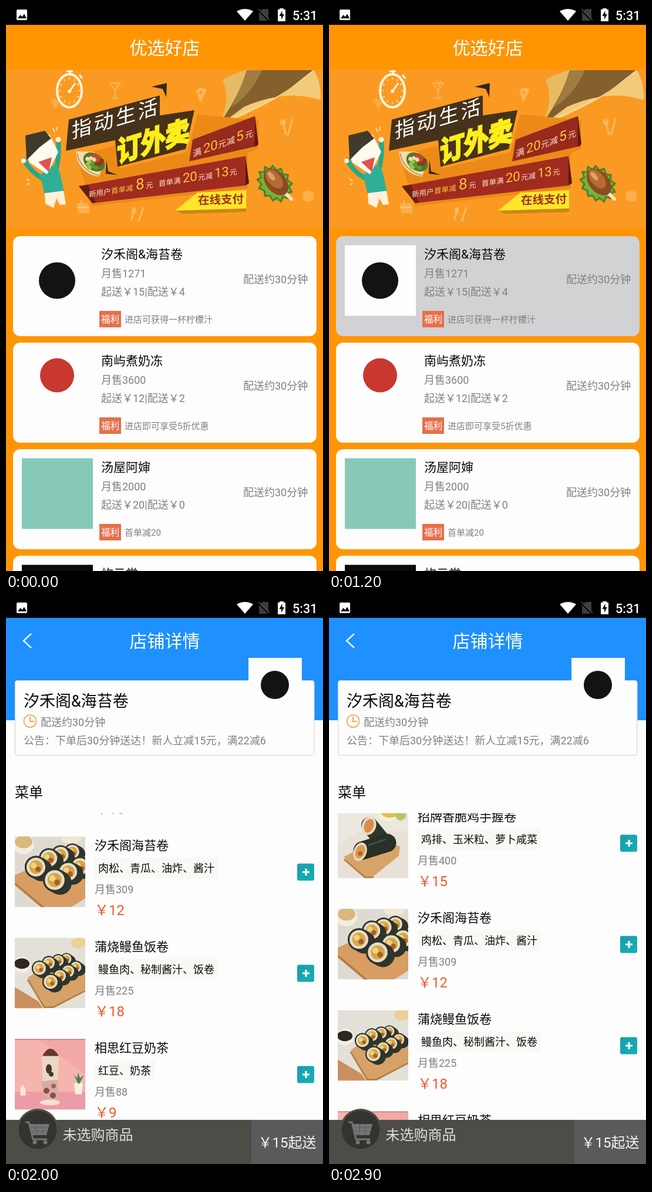
Write an HTML page that moves like this. It is 540 px wide and 960 px high and loops after 3 s.

```html
<!DOCTYPE html>
<html lang="zh-CN">
<head>
<meta charset="utf-8">
<title>优选好店</title>
<style>
html, body { margin: 0; width: 100%; height: 100%; overflow: hidden; background: #ff9503; }
svg { display: block; width: 100vw; height: 100vh; }
text { font-family: Roboto, "Noto Sans CJK SC", "Noto Sans CJK JP", "Noto Sans CJK", sans-serif; }
</style>
</head>
<body>
<svg id="stage" viewBox="0 0 540 960" xmlns="http://www.w3.org/2000/svg"></svg>
<script>
const PAPER = '#fdfdfd', GREY = '#808080', BLACK = '#0a0a0a', ORANGE = '#ff9503';

// cy is the middle of the Chinese glyphs
const text = (s, x, cy, size, fill = BLACK, extra = '') =>
  `<text x="${x}" y="${(cy + size * 0.37).toFixed(2)}" font-size="${size}" fill="${fill}" ${extra}>${s}</text>`;
const rect = (x, y, w, h, fill, r = 0, extra = '') =>
  `<rect x="${x}" y="${y}" width="${w}" height="${h}" rx="${r}" fill="${fill}" ${extra}/>`;
const circle = (x, y, r, fill, extra = '') => `<circle cx="${x}" cy="${y}" r="${r}" fill="${fill}" ${extra}/>`;
const oval = (x, y, rx, ry, fill, turn = 0) =>
  `<ellipse rx="${rx}" ry="${ry}" fill="${fill}" transform="translate(${x} ${y}) rotate(${turn})"/>`;
const path = (d, fill, extra = '') => `<path d="${d}" fill="${fill}" ${extra}/>`;
const line = (d, color, w, extra = '') =>
  `<path d="${d}" fill="none" stroke="${color}" stroke-width="${w}" ${extra}/>`;
const group = (body, extra = '') => `<g ${extra}>${body}</g>`;
const at = (x, y, body) => group(body, `transform="translate(${x} ${y})"`);

function statusBar() {
  return rect(0, 0, 540, 32, '#000') +
    rect(18, 6, 18, 18, '#fff', 2) + path('M20 21L24.500 15L27.500 18.500L31 13.500L35 21Z', '#000') +
    path('M393 9Q407 1 421 9L407 25Z', '#fff') +
    path('M437 5H447V25H431V11Z', '#3c3c3c') + line('M429 6L448 25', '#000', 3) + line('M430 5L449 24', '#555', 1.500) +
    path('M466 4H473V6H476V26H463V6H466Z', '#fff') + path('M470.500 8L465.500 17H469V23L474 14H470.500Z', '#000') +
    text('5:31', 488, 16, 21.500, '#fff', 'font-weight="500"');
}

function stopwatch() {
  let ticks = '';
  for (let i = 0; i < 12; i++) {
    ticks += `<path d="M0 -23V-19" stroke="#fff6e0" stroke-width="1.500" transform="translate(108 144) scale(.8 1) rotate(${i * 30})"/>`;
  }
  return `<ellipse cx="108" cy="144" rx="21" ry="28" fill="none" stroke="#fff6e0" stroke-width="4"/>` + ticks +
    line('M108 145L118 131M103 111H114M109 109V117M125 117L130 123', '#fff6e0', 3) + circle(108, 145, 3, '#fff6e0');
}

function pageCurl() {
  return path('M358 207Q386 163 369 126L376 121L410 108H424Q392 166 358 207Z', '#e6bb63') +
    path('M364 199Q398 152 410 109H526Q478 155 364 199Z', '#84602c') +
    path('M384 172Q402 137 410 109H436Q418 150 384 172Z', '#a17c40') +
    path('M360 205Q452 166 486 140L524 109Q537 128 536 160Q478 140 406 171Z', '#f3ca78') +
    line('M364 200Q450 165 486 139L524 109', '#fbe2ad', 1.500);
}

function boy() {
  return line('M31 262Q44 284 64 294M82 290Q92 260 89 228', '#27a88a', 8, 'stroke-linecap="round"') +
    path('M58 287L84 268L92 284L99 316L66 320Z', '#2fb096') +
    path('M66 318L98 314L102 337L92 338L86 327L81 343L67 336Z', '#fff1dc') +
    path('M34 248L74 218L89 248L70 286L40 266Z', '#fffaf0') +
    path('M33 220L66 212L77 225L57 240L35 262Z', '#403a2c') +
    path('M55 265L78 257L73 282Z', '#de544e') +
    circle(89, 227, 4.500, '#fff1dc') + circle(30, 263, 4, '#fff1dc') +
    line('M80 207L83 214M87 205L86 212M35 294L40 297M36 303L40 302', '#fff1dc', 1.500);
}

function wrapRoll() {
  const colors = ['#d2402c', '#5f9a2c', '#f0dcb4', '#8a3a1e', '#9ac448'];
  let filling = '';
  for (let i = 0; i < 16; i++) {
    const a = i * 2.4, r = Math.sqrt(i / 16);
    filling += circle((150 + 15 * r * Math.cos(a)).toFixed(1), (265 + 12 * r * Math.sin(a)).toFixed(1), 3.5, colors[i % 5]);
  }
  return path('M119 247Q122 284 158 290L168 268L150 248Z', '#f3dcae') + oval(150, 265, 20, 14, '#4c7a28', 35) +
    filling + line('M121 250Q127 279 158 288', '#b58a50', 1.500);
}

function lettuce(radius, fill) {
  let d = '';
  for (let i = 0; i < 26; i++) {
    const a = i * Math.PI / 13, r = radius * (i % 2 ? 0.84 : 1.06);
    d += `${i ? 'L' : 'M'}${(r * Math.cos(a)).toFixed(1)} ${(r * 0.8 * Math.sin(a)).toFixed(1)}`;
  }
  return group(path(d + 'Z', fill), 'transform="translate(458 302) rotate(48)"');
}

function drumstick() {
  return lettuce(34, '#4a8428') + lettuce(29, '#78b23a') +
    line('M470 312L486 328', '#f6e6c4', 6, 'stroke-linecap="round"') +
    oval(460, 299, 17, 26, '#8e4a20', -40) + oval(457, 294, 11, 19, '#b36c34', -40) + oval(452, 289, 4, 9, '#dca468', -40);
}

function faintIcons() {
  return line('M177 131H195L186 144ZM186 144V156M180 157H192M190 128L187 137', '#ffbf6c', 1.500) +
    path('M324 143Q334 135 342 143L331 164Z', '#ffb657') + circle(332, 147, 2.500, '#fb9a25') +
    line('M471 195L477 219M488 192L480 220M468 193L469 200L475 200L474 192', '#ffb960', 3) +
    line('M213 364L220 343M226 366L234 342M217 342L216 350L222 351', '#ffb960', 3) +
    path('M121 335H140L143 352H123Z', '#fdb04c') + line('M121 342H142M128 330V335', '#fdc582', 2) +
    path('M505 318Q514 309 525 318L523 330Q513 336 506 328Z', '#fdb04c') +
    path('M75 160Q81 153 91 163L84 175Z', '#fdab45');
}

function banner() {
  const skew = (x, y, slope, body, tall = 1) => group(body, `transform="matrix(1 ${slope} 0 ${tall} ${x} ${y})"`);
  const pale = '#ffe6c4', gold = '#ffc638';
  // [text, x, size, colour] pieces along a ribbon
  const run = list => list.map(([s, x, size, c]) => `<text x="${x}" y="0" font-size="${size}" fill="${c}">${s}</text>`).join('');
  return rect(0, 108, 540, 270, '#fb9a22') + faintIcons() + stopwatch() + pageCurl() +
    path('M120 254L190 236L194 276L309 248L326 184L430 194V242L412 250V310L146 340Z', '#ec8a18') +
    path('M107 193L262 152V186L321 177L306 243L190 273L186 228L102 246Z', '#46321a') +
    path('M248 137L274 131L273 155L267 141Z', '#33271a') + path('M171 262L174 281L190 287L170 285Z', '#33271a') +
    skew(112, 225, -0.29, `<text font-size="34" letter-spacing="3.500" font-weight="500" fill="#fff">指动生活</text>`) +
    skew(189, 266, -0.31, `<text font-size="42" letter-spacing="-1" font-weight="900" fill="#ffee1a" stroke="#ffee1a" stroke-width="2.500">订外卖</text>`, 1.15) +
    path('M318 227L424 187L428 238L312 264Z', '#962a1c') + path('M424 187L430 235L424 239Z', '#5a1810') +
    skew(318, 257, -0.35, run([['满', 0, 15, pale], ['20', 18, 22, gold], ['元减', 43, 14.500, pale], ['5', 74, 23, gold], ['元', 89, 14, pale]])) +
    path('M124 306L408 255V305L147 335Z', '#a02c20') + path('M408 255L414 301L408 305Z', '#5a1810') +
    path('M124 306L140 304L153 334L147 335Z', '#6a1e14') +
    skew(141, 325, -0.155, run([['新用户', 0, 12.500, pale], ['首单减', 38, 12.500, gold], ['8', 80, 26, gold], ['元', 97, 12.500, pale],
      ['首单满', 119, 12.500, pale], ['20', 160, 22, gold], ['元减', 186, 12.500, pale], ['13', 214, 22, gold], ['元', 240, 12.500, pale]])) +
    path('M288 348L326 317L409 313V344Z', '#ffe62a') + path('M288 348L409 344V350L300 353Z', '#c98814') +
    skew(327, 337, -0.03, `<text font-size="19.500" font-weight="700" fill="#a03018">在线支付</text>`) +
    boy() + wrapRoll() + drumstick();
}

const SHOP = '汐禾阁';
const shops = [
  [SHOP + '&amp;海苔卷', 1271, 15, 4, '进店可获得一杯柠檬汁', circle(60, 60, 31, '#151312')],
  ['南屿煮奶冻', 3600, 12, 2, '进店即可享受5折优惠', circle(60, 40, 29, '#c8382e')],
  ['汤屋阿婶', 2000, 20, 0, '首单减20', rect(0, 0, 121, 120, '#87c9b8')],
  ['炊云堂', 1800, 20, 3, '首单减10', rect(0, 0, 121, 120, '#0a0a0a')]
];

function shopCard([name, sold, min, fee, gift, logo], i) {
  return at(0, 391 + 181 * i,
    rect(12, 0, 517, 170, PAPER, 12, i ? '' : 'id="first"') +
    at(27, 15.500, rect(0, 0, 121, 120, PAPER) + logo) +
    text(name, 162, 30, 21) +
    text('月售' + sold, 162, 63, 18, GREY) +
    text(`起送￥${min}|配送￥${fee}`, 162, 94, 18, GREY) +
    text('配送约30分钟', 404, 73.500, 18, GREY) +
    rect(159, 127, 37, 28, '#e5704c') + text('福利', 162, 141.500, 15.500, '#fff') +
    text(gift, 202, 141.500, 15, GREY));
}

function listPage() {
  return rect(0, 32, 540, 928, ORANGE) + text('优选好店', 210.500, 70.500, 30, '#fff') +
    banner() + shops.map(shopCard).join('');
}

const slice = (x, y, r) => circle(x, y, r, '#30332c') + circle(x, y, r * 0.84, '#e6ddc4') +
  circle(x, y, r * 0.6, '#d6a548') + circle(x - r * 0.2, y - r * 0.15, r * 0.26, '#f1d37a') + circle(x + r * 0.2, y + r * 0.2, r * 0.24, '#a85e2c');
const roll = (x, y, dx, dy, r) =>
  line(`M${x} ${y}l${dx} ${dy}`, '#2d352c', r * 2, 'stroke-linecap="round"') + slice(x, y, r);

const photos = [
  () => rect(0, 0, 120, 120, '#ece7df') + path('M0 62L40 40H120V120H0Z', '#e7e1d7') +
    path('M10 84L70 52L106 66L104 82L60 117L46 118Z', '#d7a468') + line('M11 88L47 119L61 118', '#b98046', 3) +
    oval(88, 8, 20, 15, '#f8f0e0') + oval(89, 7, 16, 10, '#e7bd48') + circle(107, 13, 9, '#b5c668') +
    line('M54 30L72 52', '#2d352c', 28, 'stroke-linecap="round"') + oval(53, 31, 12, 16, '#e8dcc0', 20) + oval(53, 31, 8, 12, '#d98c4c', 20) +
    line('M42 73L84 60', '#283028', 31, 'stroke-linecap="round"') + line('M52 64L82 54', '#465044', 3) +
    oval(38, 75, 11, 16, '#e8dcc0', 20) + oval(38, 75, 8, 12, '#d99e4a', 20) + circle(38, 78, 4, '#b46432'),
  () => rect(0, 0, 120, 120, '#dedad2') + path('M0 66L60 38L120 60V105L96 120H50L0 78Z', '#d79d62') +
    line('M0 80L50 122', '#b77d44', 4) + oval(15, 13, 18, 17, '#f3ede2') + oval(15, 9, 15, 11, '#d8b97e') +
    oval(96, 4, 17, 8, '#f1e7d4') +
    roll(98, 26, 8, 4, 14) + roll(78, 31, 8, 4, 16) + roll(58, 37, 8, 5, 17) + roll(36, 52, 9, 5, 19) +
    roll(111, 51, 8, 4, 17) + roll(91, 60, 8, 4, 18) + roll(68, 74, 9, 5, 20),
  () => rect(0, 0, 120, 120, '#e3e0d8') + path('M0 84L40 108L48 120H0Z', '#c98f60') +
    path('M22 68L66 38L120 48V88L66 117L50 116Z', '#d6a268') + line('M22 71L50 118L66 118L120 90', '#b57e48', 3) +
    oval(12, 46, 15, 14, '#f2eee8') + oval(12, 44, 13, 9, '#302620') + oval(109, 9, 13, 9, '#e9d198') +
    roll(88, 36, 6, 4, 10) + roll(74, 39, 6, 4, 11) + roll(58, 43, 6, 4, 12) + roll(42, 52, 6, 4, 13) +
    roll(104, 50, 6, 4, 11) + roll(91, 57, 6, 4, 12) + roll(77, 65, 6, 4, 12) + roll(61, 75, 7, 4, 14),
  () => rect(0, 0, 120, 120, '#f2a8a4') + path('M0 0H40L120 60V90H0Z', '#f5b5ac') + rect(0, 90, 120, 30, '#ec9ca6') +
    rect(0, 0, 120, 1.500, '#b5766f') +
    path('M46 28H75L72 104Q60 110 49 104Z', '#ebd6c4') + path('M46 72L74 69L72 104Q60 110 49 104Z', '#d6aca4') +
    path('M47 29Q60 4 75 29Z', '#6b3430') + circle(54, 88, 5, '#8c4c4a') + circle(65, 96, 5, '#8c4c4a') + circle(66, 80, 4, '#a0625e') +
    oval(58, 51, 5, 8, '#43362e') + circle(62, 60, 4, '#43362e') + oval(60, 108, 17, 5, '#f8ded0') +
    path('M101 75H116L114 94H103Z', '#f7f0e4') + path('M108 76L100 60L106 67L108 57L111 67L118 61L110 76Z', '#478048') +
    path('M9 96L10 82L14 78L18 84L19 96Z', '#fbe4d6')
];

const dishes = [
  ['招牌香脆鸡手握卷', '鸡排、玉米粒、萝卜咸菜', 400, 15],
  [SHOP + '海苔卷', '肉松、青瓜、油炸、酱汁', 309, 12],
  ['蒲烧鳗鱼饭卷', '鳗鱼肉、秘制酱汁、饭卷', 225, 18],
  ['相思红豆奶茶', '红豆、奶茶', 88, 9]
];

function dish([name, parts, sold, price], i) {
  return at(0, 379 + 172 * i,
    at(15, 0, group(photos[i](), 'clip-path="url(#photo)"')) +
    text(name, 151, 15, 21) +
    rect(151, 36, parts.length * 18 + 12, 35, '#f8f8f4') + text(parts, 157, 54, 18) +
    text('月售' + sold, 151, 90, 18, GREY) +
    text('￥' + price, 151, 125, 24, '#ee5a30') +
    rect(496, 46, 29, 29, 'url(#teal)', 3) + line('M505 60.500H517M511 54.500V66.500', '#fff', 3));
}

function cartBar() {
  return circle(54, 901, 35, '#4d4d48') + rect(0, 885, 540, 75, '#4d4d48') + rect(418, 885, 122, 75, '#595a5c') +
    circle(54, 902, 32.500, '#333330') +
    line('M33 889H39L46 918H70', '#757575', 3) + path('M41 892H74L69 911H46Z', '#757575') +
    line('M43 898H72M44 904H71M52 892V911M62 892V911', '#5c5c5a', 1) +
    circle(49, 923, 3.500, '#757575') + circle(67, 923, 3.500, '#757575') +
    text('未选购商品', 96.500, 910.500, 24, '#dedede') + text('￥15起送', 429.500, 923, 24, '#f5f5f5');
}

function detailPage() {
  return rect(0, 32, 540, 928, PAPER) + rect(0, 32, 540, 174, '#1e90ff') +
    line('M43 59L30 71L43 83', '#e6f3ff', 2.500) + text('店铺详情', 210.500, 70.500, 30, '#fff') +
    rect(15.500, 138.500, 509.500, 127, PAPER, 4, 'stroke="#d6d6cc" stroke-width="1.200"') +
    rect(413, 100, 91, 91, PAPER) + circle(458, 146, 24, '#151312') +
    text(SHOP + '&amp;海苔卷', 30, 173, 27) +
    circle(41, 207.500, 10.500, '#fffaf0', 'stroke="#e9b872" stroke-width="2"') + line('M41 200V208H48', '#e9a85a', 2) +
    text('配送约30分钟', 59, 209, 18, GREY) +
    text('公告：下单后30分钟送达！新人立减15元，满22减6', 30, 240, 18, GREY) +
    text('菜单', 15, 328.500, 24) +
    group(group(dishes.map(dish).join(''), 'id="menu"'), 'clip-path="url(#list)"') + cartBar();
}

document.getElementById('stage').innerHTML =
  `<defs><clipPath id="photo"><rect width="120" height="120"/></clipPath>
  <clipPath id="list"><rect y="364" width="540" height="521"/></clipPath>
  <linearGradient id="teal" x2="1" y2="1"><stop stop-color="#1b9cad"/><stop offset="1" stop-color="#14b0b4"/></linearGradient></defs>` +
  group(listPage(), 'id="home"') + group(detailPage(), 'id="detail"') + statusBar();

const [home, detail, first, menu] = ['home', 'detail', 'first', 'menu'].map(id => document.getElementById(id));
const LOOP = 3000, STEP = 100, PRESS = 1100, OPEN = 1300, END = 166.5;

function ease(from, to, t) {
  const k = Math.min(1, Math.max(0, (t - from) / (to - from)));
  return k * k * (3 - 2 * k);
}

function draw(ms) {
  const t = Math.floor((ms % LOOP) / STEP) * STEP;
  const open = t >= OPEN;
  home.style.display = open ? 'none' : '';
  detail.style.display = open ? '' : 'none';
  first.setAttribute('fill', t >= PRESS ? '#d1d2d3' : PAPER);
  const scroll = END * (ease(1400, 2160, t) - ease(2400, 3060, t));
  menu.setAttribute('transform', `translate(0 ${-scroll.toFixed(1)})`);
}

const start = performance.now();
function tick() {
  draw(performance.now() - start);
  requestAnimationFrame(tick);
}
tick();
</script>
</body>
</html>
```
